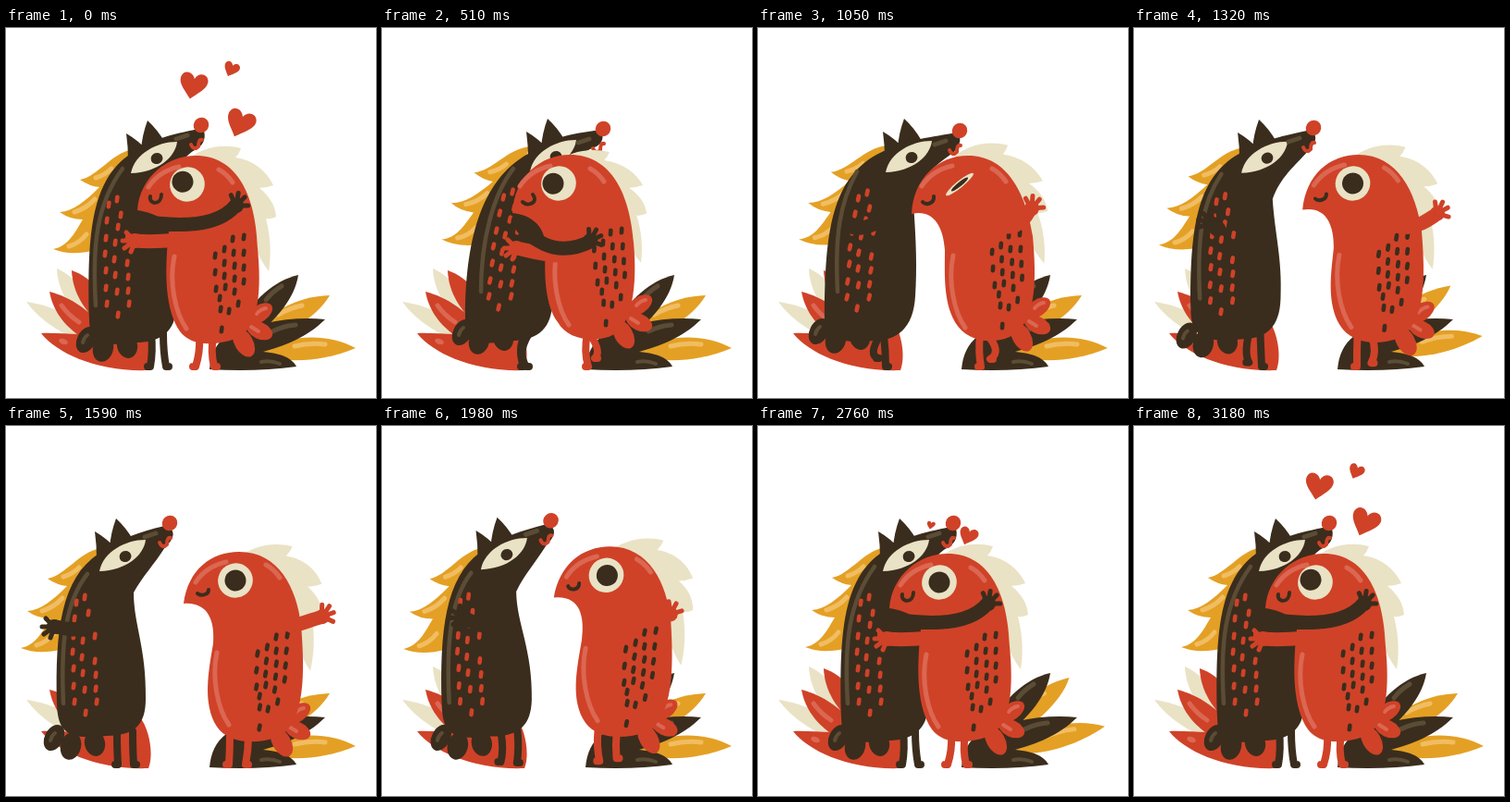
Recreate the animation shown at these times as an HTML page. Size 400 by 400 pixels, loop 3210 ms.

```html
<!DOCTYPE html>
<html lang="en">
<head>
<meta charset="utf-8">
<title>Hug</title>
<style>
  html, body { margin: 0; width: 100%; height: 100%; overflow: hidden; background: #fff; }
  svg { display: block; width: 100vw; height: 100vh; }
</style>
</head>
<body>
<svg id="stage" viewBox="0 0 400 400"></svg>
<script>
const RED = '#cf4228', DARK = '#3a2d1d', ORANGE = '#e4a024', CREAM = '#eae2c5';
const RED_LIGHT = '#db6752', DARK_LIGHT = '#5b4c36', ORANGE_LIGHT = '#f1bd62';
const LOOP = 3210, STEP = 30;
const POSE_TIMES = [0, 510, 1050, 1590, 1780, 2310, 2760, LOOP];
const POSE_ORDER = [0, 1, 2, 3, 3, 4, 0, 0];

const stage = document.getElementById('stage');
const tracks = [];

function add(parent, tag, attrs = {}) {
  const el = document.createElementNS('http://www.w3.org/2000/svg', tag);
  for (const key in attrs) el.setAttribute(key, attrs[key]);
  return parent.appendChild(el);
}
const group = (parent, attrs) => add(parent, 'g', attrs);
const shape = (parent, d, fill) => add(parent, 'path', { d, fill });
const line = (parent, d, stroke, width) => add(parent, 'path', {
  d, stroke, 'stroke-width': width, fill: 'none', 'stroke-linecap': 'round', 'stroke-linejoin': 'round'
});
const oval = (parent, cx, cy, rx, ry, fill, turn = 0) =>
  add(parent, 'ellipse', { cx, cy, rx, ry, fill, transform: `rotate(${turn} ${cx} ${cy})` });

// Smooth interpolation that never overshoots its keys.
function curve(times, values, t) {
  let i = 0;
  while (i < times.length - 2 && t >= times[i + 1]) i++;
  const slope = k => (values[k + 1] - values[k]) / (times[k + 1] - times[k]);
  const tangent = k => {
    if (k === 0 || k === times.length - 1) return 0;
    const a = slope(k - 1), b = slope(k);
    return a * b <= 0 ? 0 : 2 * a * b / (a + b);
  };
  const h = times[i + 1] - times[i], u = (t - times[i]) / h, v = 1 - u;
  return values[i] * (1 + 2 * u) * v * v + tangent(i) * h * u * v * v
    + values[i + 1] * u * u * (3 - 2 * u) - tangent(i + 1) * h * u * u * v;
}

// Animates every number inside an attribute string.
function track(el, attr, keys, times = POSE_TIMES, order = POSE_ORDER) {
  const rows = keys.map(k => k.match(/-?[\d.]+/g).map(Number));
  const columns = rows[0].map((_, c) => order.map(p => rows[p][c]));
  tracks.push(t => {
    let c = 0;
    el.setAttribute(attr, keys[0].replace(/-?[\d.]+/g, () => curve(times, columns[c++], t).toFixed(3)));
  });
  return el;
}
const morph = (el, ...keys) => track(el, 'd', keys);
const shift = (el, ...keys) => track(el, 'transform', keys.map(k => `translate(${k})`));
const bump = (t, at, width) => Math.abs(t - at) < width ? Math.cos((t - at) / width * Math.PI / 2) ** 2 : 0;

// Tails
const leftTail = group(stage);
shape(leftTail, 'M100 345C65 335 38 318 22 296C50 300 75 312 105 335Z', CREAM);
shape(leftTail, 'M92 325C70 306 56 285 55 260C75 268 88 290 102 312Z', CREAM);
shape(leftTail, 'M105 325C85 305 72 287 71 262C94 270 108 290 125 320Z', RED);
shape(leftTail, 'M100 345C65 328 51 307 47 285C70 291 92 305 115 335Z', RED);
line(leftTail, 'M60 300Q68 311 79 318', RED_LIGHT, 5);
shape(stage, 'M38 330C55 352 100 372 154 370C160 355 155 328 145 315L110 328C85 334 60 329 38 330Z', RED);
oval(stage, 62, 339, 5, 3, RED_LIGHT, 20);

const orangeTop = group(stage);
shape(orangeTop, 'M258 338C280 308 315 290 350 289C336 314 300 332 268 345Z', ORANGE);
line(orangeTop, 'M294 310Q306 303 320 300', ORANGE_LIGHT, 5);
shape(stage, 'M248 325C268 293 290 273 316 267C312 292 295 312 265 338Z', DARK);
line(stage, 'M281 294Q288 285 298 279', DARK_LIGHT, 5);
const orangeLow = group(stage);
shape(orangeLow, 'M275 350C300 334 342 327 378 346C345 360 310 362 283 356Z', ORANGE);
line(orangeLow, 'M312 344Q328 340 345 342', ORANGE_LIGHT, 5);
shape(stage, 'M238 333C268 319 310 311 345 315C325 335 300 344 278 350C300 352 310 358 314 366Q270 372 220 369Q222 345 238 333Z', DARK);
line(stage, 'M288 328Q300 322 313 321', DARK_LIGHT, 5);
line(stage, 'M276 361Q286 359 296 363', DARK_LIGHT, 4);

const pair = group(stage);

function leg(color, side, ...keys) {
  morph(line(pair, '', color, 8), ...keys.map(k => `${k}l${side * 3} 0`));
}

// Short dashes scattered on a body; each pose moves and leans them.
function dashes(color, spots, poses, base, reach) {
  const el = line(pair, '', color, 4.6);
  const columns = [0, 1, 2].map(c => POSE_ORDER.map(p => poses[p][c]));
  tracks.push(t => {
    const [dx, dy, lean] = columns.map(values => curve(POSE_TIMES, values, t));
    const place = (x, y) => `${(x + dx + lean * (base - y) / reach).toFixed(1)} ${(y + dy).toFixed(1)}`;
    el.setAttribute('d', spots.map(([x, y]) => `M${place(x + .4, y - 2.3)}L${place(x - .2, y + 2.3)}`).join(''));
  });
}

function arm(color, keys, hands) {
  morph(line(pair, '', color, 15), ...keys);
  const hand = track(group(pair), 'transform', hands);
  oval(hand, 0, 0, 8, 8, color);
  line(hand, 'M0 -2L4 -12M0 0L11 -8M0 0L13 0M0 0L9 9', color, 5);
}

// Dark animal
const mane = track(group(pair), 'transform', [
  'translate(0 0) rotate(0 135 133)', 'translate(22 -3) rotate(4.8 135 133)', 'translate(1 -4) rotate(4.3 135 133)',
  'translate(-35 1) rotate(0 135 133)', 'translate(-11 3) rotate(-1.8 135 133)']);
shape(mane, 'M137 131C113 136 100 160 80 164Q90 171 101 172C86 187 73 198 58 199Q69 207 83 207C74 222 67 236 51 239Q70 247 97 240L125 190Z', ORANGE);
line(mane, 'M97 162Q107 159 114 152M74 199Q87 195 96 185M68 236Q79 233 87 223', ORANGE_LIGHT, 5);

leg(DARK, -1, 'M157 330Q159 350 156 366', 'M155 332Q146 345 153 366', 'M132 332Q118 355 131 357', 'M120 330Q120 350 121 366', 'M150 332Q158 352 148 357');
leg(DARK, 1, 'M170 330Q170 350 173 366', 'M158 332Q146 352 156 366', 'M136 332Q138 350 138 366', 'M137 330Q137 350 138 366', 'M168 330Q172 350 166 360');

const ears = shift(group(pair), '0 0', '26 -2', '5 -2', '-34 0', '-12 0');
shape(ears, 'M130 114Q132 128 132 144L154 134Q144 122 130 114ZM153 100Q147 116 146 132L172 124Q164 110 153 100Z', DARK);

morph(shape(pair, '', DARK),
  'M90 315C88 230 90 165 135 136C160 118 185 114 213 108C217 118 214 126 206 131C192 138 186 150 180 165C184 200 184 250 184 300C184 330 165 340 140 340C105 345 90 340 90 315Z',
  'M90 312C90 235 105 165 158 136C185 116 210 114 236 110C241 118 238 124 232 128C215 134 205 145 190 165C184 200 180 250 184 300C182 328 165 338 140 338C105 344 88 340 90 312Z',
  'M72 305C73 225 78 160 134 134C160 120 190 118 214 113C222 118 218 128 211 135C195 146 175 160 168 190C171 230 172 260 170 290C168 325 150 338 125 338C85 342 70 335 72 305Z',
  'M55 300C53 220 60 165 100 138C122 122 145 114 172 108C185 112 182 122 172 131C160 150 148 162 138 180C138 215 152 240 151 295C151 322 140 335 108 335C65 340 56 330 55 300Z',
  'M87 310C84 225 88 165 124 136C148 118 172 114 195 106C206 108 203 118 195 126C182 145 172 158 166 178C168 215 186 245 185 300C183 325 170 338 140 338C100 343 88 338 87 310Z');

morph(line(pair, '', DARK_LIGHT, 4.5),
  'M97 300C93 235 98 190 126 152', 'M107 285C107 230 120 180 142 152', 'M86 285C83 225 88 190 107 155',
  'M62 300C59 235 64 190 88 160', 'M96 298C92 235 96 185 118 158');

const darkLobes = shift(group(pair), '0 0', '0 -8', '-21 -9', '-35 0', '2 0');
oval(darkLobes, 87, 337, 10, 15, DARK, 28);
oval(darkLobes, 105, 346, 11, 15, DARK, 14);
oval(darkLobes, 131, 343, 11, 14, DARK, -12);
line(darkLobes, 'M83 340Q84 335 88 332', DARK_LIGHT, 4);

dashes(RED, [
  [120, 185], [111, 191], [124, 202], [109, 208], [121, 215], [131, 227], [108, 227], [118, 232], [107, 244],
  [117, 250], [131, 254], [108, 262], [118, 267], [132, 269], [108, 281], [120, 285], [132, 284],
  [109, 298], [133, 298], [121, 310]
], [[0, 0, 0], [5, -8, 16], [-14, -7, 12], [-35, 0, 0], [-1, 0, -7]], 310, 125);

const darkEye = shift(group(pair), '0 0', '25 -2', '3 -1', '-34 0', '-11 -3');
shape(darkEye, 'M135 157C139 136 163 123 185 123C183 140 164 156 135 157Z', CREAM);
oval(darkEye, 163, 141, 6.5, 6, DARK, -25);

const snout = shift(group(pair), '0 0', '28 4', '7 6', '-34 0', '-12 -5');
line(snout, 'M184 120L196 116', DARK_LIGHT, 5);
line(snout, 'M200 126Q203 133 208 128Q208 120 212 121', RED, 4);
oval(snout, 211, 105, 8.5, 8, RED, -40);

// Red animal
const crest = track(group(pair), 'transform', [
  'matrix(1 0 0 1 0 0)', 'matrix(1 0 .03 .9 -12 17)', 'matrix(1 0 .07 .96 7 2)',
  'matrix(1 0 -.08 1.01 66 -1)', 'matrix(1 0 -.09 1.01 42 -18)']);
shape(crest, 'M195 143C210 130 232 124 254 130Q252 136 248 140C268 143 282 155 289 170Q281 173 274 173C284 181 291 191 292 204Q286 207 281 206C286 225 287 245 284 263C274 250 268 235 262 215Z', CREAM);

leg(RED, -1, 'M209 335Q210 350 205 366', 'M222 330Q218 350 223 366', 'M240 332Q238 350 241 366', 'M242 335Q242 350 241 366', 'M213 320Q210 340 218 354');
leg(RED, 1, 'M224 335Q221 350 225 366', 'M224 330Q238 350 230 357', 'M248 332Q264 350 251 358', 'M262 335Q262 350 259 366', 'M232 320Q228 335 237 345');

const redLobes = shift(group(pair), '0 0', '4 -9', '28 -6', '41 2', '7 -9');
oval(redLobes, 274, 309, 9, 16, RED, 55);
oval(redLobes, 274, 327, 9, 15, RED, -65);
oval(redLobes, 257, 340, 10, 17, RED, -30);

morph(shape(pair, '', RED),
  'M142 197C145 160 175 138 205 138C248 138 270 178 272 238C276 280 275 325 248 336C225 344 200 344 188 328C172 305 171 265 176 220C172 205 160 200 142 197Z',
  'M141 200C143 160 172 137 203 137C248 137 268 180 272 232C276 275 272 325 245 334C225 340 200 336 190 318C176 300 175 265 177 235C175 212 160 202 141 200Z',
  'M166 201C168 162 195 138 227 138C270 138 290 180 297 225C301 270 302 320 272 334C250 343 225 338 213 318C200 295 202 265 202 240C200 212 188 196 166 201Z',
  'M192 192C197 155 222 136 252 136C295 136 314 175 319 215C323 265 324 320 295 336C268 345 240 343 228 325C212 300 219 265 224 235C226 210 218 190 192 192Z',
  'M165 174C172 142 198 121 228 121C268 122 289 160 291 205C293 260 288 308 262 320C238 328 212 328 198 312C180 290 187 255 192 225C198 195 196 170 165 174Z');

line(redLobes, 'M271 309Q275 304 281 303M265 323L273 328', RED_LIGHT, 4);
const belly = shift(group(pair), '0 0', '7 -4', '29 -1', '46 -2', '15 -15');
line(belly, 'M182 247C176 275 183 308 195 325', RED_LIGHT, 5);

dashes(DARK, [
  [245, 228], [257, 226], [236, 239], [226, 246], [246, 243], [257, 243], [236, 254], [247, 257], [257, 259],
  [226, 264], [236, 268], [247, 271], [257, 274], [227, 282], [237, 280], [247, 285], [231, 292],
  [251, 298], [232, 304], [241, 306], [233, 326]
], [[0, 0, 0], [9, -7, -7], [31, -4, -5], [41, 0, 6], [7, -13, 11]], 325, 98);

const redHead = shift(group(pair), '0 0', '-5 -1', '23 -1', '51 -3', '26 -19');
line(redHead, 'M154 172Q165 155 187 150M230 153Q239 158 245 167', RED_LIGHT, 5);
const eye = shift(group(pair), '196 169', '191 168', '218 169', '248 167', '223 152');
const lid = track(group(eye), 'transform',
  ['rotate(-32) scale(1 1)', 'rotate(-39) scale(1 .2)', 'rotate(-27) scale(1 .3)'],
  [0, 880, 1050, 1210, 2130, 2310, 2480, LOOP], [0, 0, 1, 0, 0, 2, 0, 0]);
oval(lid, 0, 0, 19, 18.5, CREAM);
const pupil = track(group(lid), 'transform',
  ['translate(-2.8 -5)', 'translate(-5.2 -3)', 'translate(0 0)', 'translate(2 2)'],
  POSE_TIMES, [0, 1, 2, 2, 2, 3, 2, 0]);
oval(pupil, 0, 0, 11.5, 11.5, DARK);
morph(line(pair, '', DARK, 4),
  'M156 182C154 191 168 192 168 180', 'M152 188C158 194 170 188 163 180', 'M178 188C181 192 191 190 190 182',
  'M207 181C210 184 219 183 219 177', 'M181 159C179 169 193 169 193 158');

arm(RED,
  ['M185 229C165 231 150 231 140 230', 'M187 246C170 244 160 241 146 238', 'M270 215C280 215 288 207 293 198', 'M308 216C322 214 330 209 340 207', 'M240 190C230 195 222 198 218 200'],
  ['translate(139 230) rotate(180)', 'translate(145 238) rotate(180)', 'translate(296 195) rotate(310)', 'translate(342 206) rotate(340)', 'translate(218 200) rotate(200)']);
arm(DARK,
  ['M140 208C170 213 225 220 248 192', 'M147 209C158 225 185 251 225 231', 'M100 215C110 218 125 215 135 205', 'M88 217C78 222 70 220 54 217', 'M165 211C175 212 183 200 187 188'],
  ['translate(249 192) rotate(-45)', 'translate(225 230) rotate(-25)', 'translate(135 205) rotate(-60)', 'translate(52 217) rotate(-180)', 'translate(187 187) rotate(-65)']);

const hearts = [
  { from: [182, 113], to: [203, 61], size: 1, birth: 2700, tilt: 8 },
  { from: [228, 100], to: [244, 44], size: .56, birth: 2850, tilt: 20 },
  { from: [215, 123], to: [254, 102], size: 1.04, birth: 2630, tilt: 18 }
].map(h => ({ ...h, el: shape(stage, 'M-2 16C-8 8 -16 2 -15 -6C-13 -15 -3 -14 0 -6C3 -14 14 -14 15 -5C15 3 5 9 -2 16Z', RED) }));

function drawHearts(t) {
  for (const h of hearts) {
    const age = (t < 1000 ? t + LOOP : t) - h.birth, life = LOOP - h.birth;
    const fade = Math.max(0, Math.min(1, 1 - (age - life) / 180));
    const scale = h.size * Math.min(1, Math.max(0, age) / 200) * fade;
    const u = Math.min(age / life, 1.2);
    const x = h.from[0] + (h.to[0] - h.from[0]) * u + 4 * Math.sin(u * Math.PI * 2);
    const y = h.from[1] + (h.to[1] - h.from[1]) * u;
    h.el.setAttribute('display', scale > .01 ? 'inline' : 'none');
    h.el.setAttribute('transform', `translate(${x} ${y}) rotate(${h.tilt}) scale(${scale})`);
  }
}

function draw(now) {
  const t = Math.floor(now % LOOP / STEP) * STEP;
  tracks.forEach(update => update(t));
  const hop = 9 * bump(t, 2080, 130) + 18 * bump(t, 2480, 170);
  pair.setAttribute('transform', `translate(0 370) scale(1 ${1 + hop / 270}) translate(0 -370)`);
  const wag = -12 * (bump(t, 2750, 200) + .6 * bump(t, 800, 200) + .6 * bump(t, 1320, 200));
  orangeTop.setAttribute('transform', `rotate(${wag} 262 345)`);
  orangeLow.setAttribute('transform', `rotate(${wag} 275 350)`);
  leftTail.setAttribute('transform', `rotate(${5 * (bump(t, 800, 200) + bump(t, 2530, 180))} 105 340)`);
  drawHearts(t);
}

const start = performance.now();
function tick() {
  draw(performance.now() - start);
  requestAnimationFrame(tick);
}
tick();
</script>
</body>
</html>
```
